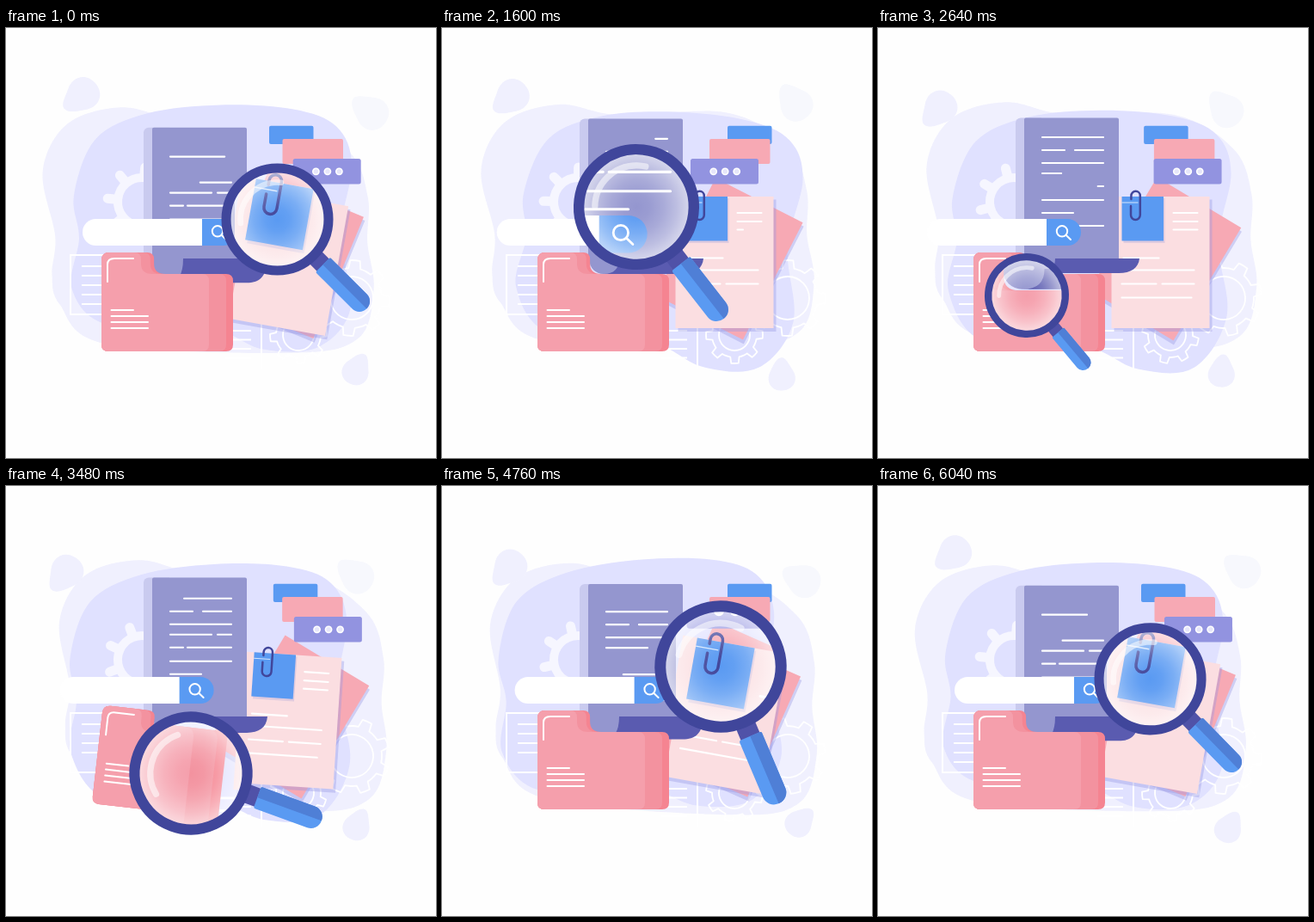
These frames come from a looping animation (500x500 px, 6080 ms). An HTML page with a canvas:

```html
<!DOCTYPE html>
<html lang="en">
<head>
<meta charset="utf-8">
<title>File search</title>
<style>
html, body { margin: 0; width: 100%; height: 100%; overflow: hidden; background: #fefefe; }
canvas { display: block; width: 500px; height: 500px; }
</style>
</head>
<body>
<canvas id="stage"></canvas>
<script>
const LOOP = 6080, STEP = 40, ZOOM = 1.4;
const canvas = document.getElementById('stage');
const dpr = window.devicePixelRatio || 1;
canvas.width = canvas.height = 500 * dpr;
const c = canvas.getContext('2d');

const clamp = v => Math.min(1, Math.max(0, v));
const rad = d => d * Math.PI / 180;
const ease = u => (1 - Math.cos(Math.PI * clamp(u))) / 2;

// Cosine sway: value a at time peak, b half a loop later
const wave = (t, a, b, peak) => (a + b) / 2 + (a - b) / 2 * Math.cos(2 * Math.PI * (t - peak) / LOOP);

// Eases from a to b during t0..t1 and back during t2..t3
function swing(t, a, b, [t0, t1, t2, t3], period = LOOP) {
  const u = t0 + ((t - t0) % period + period) % period;
  return a + (b - a) * (ease((u - t0) / (t1 - t0)) - ease((u - t2) / (t3 - t2)));
}

function fill(color, path) {
  c.fillStyle = color;
  path ? c.fill(path) : c.fill();
}
function rect(color, x, y, w, h, r = 0) {
  c.beginPath();
  c.roundRect(x, y, w, h, r);
  fill(color);
}
function disc(color, x, y, r) {
  c.beginPath();
  c.arc(x, y, r, 0, 7);
  fill(color);
}
function ring(x, y, r, from = 0, to = 2 * Math.PI) {
  c.beginPath();
  c.arc(x, y, r, from, to);
  c.stroke();
}
function line(x1, y1, x2, y2) {
  c.beginPath();
  c.moveTo(x1, y1);
  c.lineTo(x2, y2);
  c.stroke();
}
function dash(a, b, y) {
  if (b - a > 0.3) line(a, y, b, y);
}
function pen(color, width, cap = 'butt') {
  c.strokeStyle = color;
  c.lineWidth = width;
  c.lineCap = cap;
}
function placed(x, y, deg, scale, draw) {
  c.save();
  c.translate(x, y);
  c.rotate(rad(deg));
  c.scale(scale, scale);
  draw();
  c.restore();
}

const OUTER = [[43, 165], [72, 110], [135, 91], [205, 105], [330, 105], [400, 145], [421, 198],
  [420, 250], [427, 305], [408, 360], [330, 376], [115, 364], [62, 320], [53, 285], [57, 240]];
const INNER = [[80, 195], [105, 130], [165, 100], [250, 90], [335, 95], [385, 115], [403, 160],
  [390, 240], [402, 325], [365, 381], [300, 384], [235, 358], [120, 356], [78, 305], [86, 245]];

// Closed smooth curve; the lower half also moves by sag
function blob(color, points, dx, dy, deg, sag) {
  const n = points.length;
  const P = i => points[(i + n) % n];
  const X = i => P(i)[0] - 240;
  const Y = i => P(i)[1] - 240 + (P(i)[1] > 330 ? sag : 0);
  placed(240 + dx, 240 + dy, deg, 1, () => {
    c.beginPath();
    c.moveTo(X(0), Y(0));
    for (let i = 0; i < n; i++) {
      c.bezierCurveTo(
        X(i) + (X(i + 1) - X(i - 1)) / 6, Y(i) + (Y(i + 1) - Y(i - 1)) / 6,
        X(i + 1) - (X(i + 2) - X(i)) / 6, Y(i + 1) - (Y(i + 2) - Y(i)) / 6,
        X(i + 1), Y(i + 1));
    }
    fill(color);
  });
}

const DROP = new Path2D('M1-21C6-21 9-13 13-6C20 5 14 18 0 18C-14 18-20 5-13-6C-9-13-5-21 1-21Z');
function drop(color, x, y, deg, scale) {
  placed(x, y, deg, scale, () => fill(color, DROP));
}

function gearOutline(x, y, turn, inner, root, outer) {
  placed(x, y, turn, 1, () => {
    pen('#fff', 1.8);
    c.lineJoin = 'round';
    c.beginPath();
    for (let i = 0; i < 8; i++) {
      const a = i * Math.PI / 4;
      c.arc(0, 0, root, a - 0.39, a - 0.2);
      c.arc(0, 0, outer, a - 0.13, a + 0.13);
      c.arc(0, 0, root, a + 0.2, a + 0.39);
    }
    c.closePath();
    c.stroke();
    ring(0, 0, inner);
  });
}

function backdrop(t) {
  c.fillStyle = '#fefefe';
  c.fillRect(-500, -500, 1500, 1500);
  blob('#f0f0fe', OUTER, wave(t, -1, 17, 500), wave(t, -5, 2, 2100), wave(t, 2, -1.5, 4200), 2);
  blob('#e0e1ff', INNER, wave(t, 12, -12, 1600), wave(t, 7, -4, 1900),
    wave(t, 3.5, -3.5, 1500), wave(t, 6, -10, 2900));
  drop('#f0f0fe', wave(t, 88, 69, 250), wave(t, 75, 102, 700), wave(t, -128, -144, 700), 1.2);
  drop('#f7f8fd', wave(t, 424, 404, 5800), wave(t, 87, 110, 1450), wave(t, -37, -65, 1800), 1.2);
  drop('#f0f0fe', wave(t, 395, 416, 1700), wave(t, 404, 391, 1500), wave(t, -4, 42, 1800), 0.98);

  const turn = wave(t, 8, -21, 600);
  placed(158, 202, turn, 1, () => {
    pen('#f6f6ff', 10);
    ring(0, 0, 28);
    pen('#f6f6ff', 11, 'round');
    for (let i = 0; i < 8; i++) {
      c.rotate(Math.PI / 4);
      line(30, 0, 40, 0);
    }
  });
  gearOutline(402, 314, turn, 25, 35, 44);
  gearOutline(340, 357, -turn, 18, 26, 33);

  pen('#fff', 2);
  c.strokeRect(75, 264, 90, 69);
  for (let i = 0; i < 4; i++) {
    dash(88, 125, 277 + i * 11);
    dash(255, 285, 352 + i * 10.5);
  }
  dash(swing(t, 88, 125, [2400, 3300, 5000, 5900]), 125, 321);
  line(297, 340, 297, 396);
}

// Lines on the large page: y, then spans of the text width
const TEXT = [
  [127, 191, 262], [142, 191, 217, 229, 262], [157, 191, 262], [169, 191, 239, 246, 262],
  [184, 191, 206, 211, 262], [200, 191, 262], [215, 191, 227], [230, 191, 262]
];
// A gap runs down the lines three times per loop, wiping and rewriting them
function pageText(t, top) {
  const head = 0.89 + TEXT.length * t / (LOOP / 3), gap = 1.6;
  c.save();
  c.beginPath();
  c.rect(170, top, 110, 250 - top);
  c.clip();
  pen('#fff', 2.2, 'round');
  TEXT.forEach(([y, ...spans], i) => {
    y += 2 * (top - 104.5);
    const from = 191 + 71 * ((head - i + gap + 8) % 8 - gap), to = from + 71 * gap;
    for (let j = 0; j < spans.length; j += 2) {
      dash(spans[j], Math.min(spans[j + 1], from), y);
      dash(Math.max(spans[j], to), spans[j + 1], y);
    }
  });
  c.restore();
}

function page(t) {
  const top = swing(t, 116, 104.5, [-200, 2000, 2750, 5500]);
  const end = top + 180.5;
  rect('#c9caef', 160, top, 30, 276.5 - top, [6, 0, 0, 6]);
  rect('#9496cf', 170, top, 110, 268 - top, [2, 2, 0, 0]);
  rect('#9496cf', 171.5, 255, 50, end - 255, [0, 0, 0, 16]);
  c.beginPath();
  c.moveTo(206, 268);
  c.lineTo(304, 268);
  c.bezierCurveTo(303, end - 6, 294, end, 280, end);
  c.lineTo(188, end);
  c.quadraticCurveTo(206, end, 206, 268);
  fill('#5a5bb0');
  pageText(t, top);
}

function searchBar(t) {
  const x = swing(t, 228, 196, [0, 2300, 2750, 5400]);
  rect('#fff', x - 139, 222, 150, 31, [15.5, 0, 0, 15.5]);
  rect('#5a9af2', x, 222, 40, 31, [0, 15.5, 15.5, 0]);
  pen('#fff', 2, 'round');
  ring(x + 18, 236.3, 6.2);
  line(x + 22.8, 241, x + 28, 246);
}

function folderLayer(color, depth) {
  const tab = 157 + depth * 0.54, right = 236 + depth;
  fill(color, new Path2D(`M111 270Q111 261 120 261H${tab - 8}Q${tab} 261 ${tab} 269V274` +
    `Q${tab} 286 ${tab + 13} 286H${right - 8}Q${right} 286 ${right} 294V368` +
    `Q${right} 376 ${right - 8} 376H119Q111 376 111 368Z`));
}
const ACCENT = new Path2D('M118 295V275Q118 268 126 268H148');
function folder(t) {
  const tilt = swing(t, 0, 1, [2900, 3400, 3700, 4300]);
  const nudge = swing(t, 0, 1.5, [200, 650, 800, 1400]);
  placed(187 - 5 * tilt, 318 + 2 * tilt, 6.5 * tilt + nudge, 1, () => {
    c.translate(-187, -318);
    folderLayer('#f58491', 28);
    folderLayer('#f3929f', 20);
    folderLayer('#f59fac', 0);
    pen('#fff', 2, 'round');
    c.stroke(ACCENT);
    dash(122.5, 148, 328);
    for (let y = 335; y < 350; y += 7) dash(122.5, 165, y);
  });
}

// Lines on the small sheet, written and wiped one after another
const SHORT = [[215, 344, 372], [225, 344, 372], [234.5, 344, 372]];
const LONG = [[267.5, 286, 327], [281.5, 285, 368], [297.5, 284, 324, 331, 368], [313.5, 284, 365]];
function notes(t, rows, on, off, gapOn, gapOff) {
  pen('#fff', 2.1, 'round');
  rows.forEach(([y, ...spans], i) => {
    const first = spans[0], width = spans[spans.length - 1] - first;
    const a = first + width * clamp((t - off - i * gapOff) / 350);
    const b = first + width * clamp((t - on - i * gapOn) / 300);
    for (let j = 0; j < spans.length; j += 2)
      dash(Math.max(spans[j], a), Math.min(spans[j + 1], b), y);
  });
}

const CLIP = new Path2D('M294.5 207V217.5A5.4 5.4 0 0 0 305.3 217.5V195A5.2 5.2 0 0 0 294.9 195V199');
function sheet(color) {
  rect('rgba(150,150,225,.38)', -54, -73, 114, 153.5);
  rect(color, -57, -76.5, 114, 153);
}
function sheets(t) {
  const back = swing(t, 22.5, 31, [500, 2600, 3500, 5200]);
  const front = swing(t, 10.2, 0, [0, 1500, 2600, 4700]);
  placed(334, 268.5, back, 1, () => sheet('#f7a9b4'));
  placed(328.5, 272.5, front, 1, () => {
    sheet('#fbdee1');
    c.translate(-329, -272.5);
    notes(t, SHORT, 450, 4400, 540, 200);
    notes(t, LONG, 380, 4300, 420, 330);
    rect('rgba(150,150,210,.28)', 286, 198, 48, 52);
    rect('#5a9af2', 284, 196, 48.5, 51.5);
    pen('rgba(255,255,255,.75)', 1);
    dash(284, 303, 203);
    pen('#41469b', 2.5, 'round');
    c.stroke(CLIP);
  });
}

function bubbles(t) {
  const slide = (a, b, times) => swing(t, a, b, times, LOOP / 2);
  rect('#5a9af2', slide(306, 332, [0, 1550, 1750, 2900]), 113.7, 51.5, 21.3, 2);
  rect('#f7a9b4', slide(321.5, 311, [300, 1500, 1750, 2800]), 129, 70.5, 29, 2);
  const left = slide(335, 289, [400, 1600, 1720, 3200]);
  rect('#9293e0', left, 152, 79, 29.5, 2.5);
  for (let i = 0; i < 3; i++) {
    disc('#fff', left + 26.7 + i * 13.5, 166.8, 4.4);
    disc('#e6e6fa', left + 26.7 + i * 13.5, 166.8, 2.8);
  }
}

function scene(t) {
  backdrop(t);
  sheets(t);
  page(t);
  searchBar(t);
  bubbles(t);
  folder(t);
}

// Lens stops: time, centre, radius, handle angle, fixed point of the zoom
const STOPS = [
  [0, 315.5, 222.5, 65, 45, 315, 224],
  [680, 214.5, 168, 80, 27, 253, 200],
  [1600, 226, 208, 73, 52, 253, 232],
  [2640, 173, 311, 49, 50, 237, 238],
  [3480, 215, 334, 71.5, 20, 272, 325],
  [4000, 245, 275, 75.5, 26, 285, 270],
  [4760, 324, 210, 76.5, 67, 300, 221],
  [5350, 326, 246, 71, 54, 308, 223]
];
// Smooth path through the stops that never overshoots them
function lensPose(t) {
  const n = STOPS.length;
  const stop = j => STOPS[(j + n) % n];
  const time = j => stop(j)[0] + Math.floor(j / n) * LOOP;
  const i = STOPS.filter(s => s[0] <= t).length - 1;
  const h = time(i + 1) - time(i), u = (t - time(i)) / h;
  return STOPS[0].slice(1).map((_, k) => {
    const v = j => stop(j)[k + 1];
    const rate = j => (v(j + 1) - v(j)) / (time(j + 1) - time(j));
    const slope = j => {
      const p = rate(j - 1), q = rate(j);
      return p * q > 0 ? 2 * p * q / (p + q) : 0;
    };
    const s = u * u * (3 - 2 * u);
    return v(i) + (v(i + 1) - v(i)) * s +
      h * u * (1 - u) * ((1 - u) * slope(i) - u * slope(i + 1));
  });
}

function lens(t) {
  const [x, y, r, turn, fx, fy] = lensPose(t);
  c.save();
  c.beginPath();
  c.arc(x, y, r * 0.87, 0, 7);
  c.clip();
  c.translate(fx * (1 - ZOOM), fy * (1 - ZOOM));
  c.scale(ZOOM, ZOOM);
  scene(t);
  c.restore();

  // Unit radius, handle along the x axis
  placed(x, y, turn, r, () => {
    const glow = c.createRadialGradient(0, 0, 0, 0, 0, 0.85);
    for (let p = 0; p <= 1; p += 0.25) glow.addColorStop(p, `rgba(255,255,255,${0.62 * p ** 1.7})`);
    disc(glow, 0, 0, 0.87);
    pen('rgba(255,255,255,.55)', 0.1, 'round');
    ring(0, 0, 0.66, rad(129), rad(231));

    const round = [0.03, 0.18, 0.18, 0.03];
    rect('#5052a8', 0.93, -0.155, 0.35, 0.31);
    rect('#5a9af2', 1.15, -0.185, 1.11, 0.37, round);
    c.save();
    c.beginPath();
    c.rect(1.1, -0.2, 1.2, 0.2);
    c.clip();
    rect('#4f7fd6', 1.15, -0.185, 1.11, 0.37, round);
    c.restore();

    pen('#40469b', 0.17);
    ring(0, 0, 0.915);
  });
}

const start = performance.now();
function frame() {
  const t = Math.floor((performance.now() - start) % LOOP / STEP) * STEP;
  c.setTransform(dpr, 0, 0, dpr, 0, 0);
  scene(t);
  lens(t);
  requestAnimationFrame(frame);
}
frame();
</script>
</body>
</html>
```
